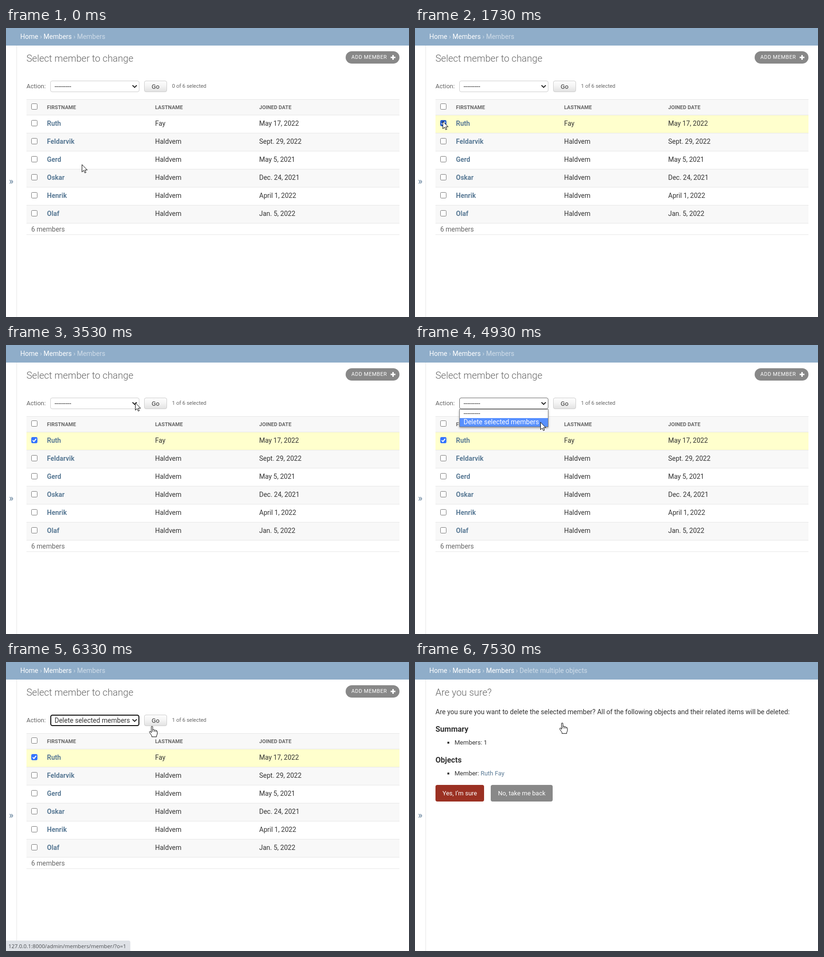
An HTML page for the animation above (8000 ms loop, 846 px wide and 609 px high).

```html
<!DOCTYPE html>
<html lang="en">
<head>
<meta charset="utf-8">
<title>Select member to change</title>
<style>
html, body { margin: 0; width: 100%; height: 100%; overflow: hidden; background: #fff; }
svg { display: block; width: 846px; height: 609px; font: 14px Roboto, Arial, sans-serif; fill: #333; }
.crumbs { fill: #cfdce8; }
.crumbs tspan, .white { fill: #fff; }
.h1 { font-size: 20px; font-weight: 300; fill: #666; }
.h2 { font-size: 16px; font-weight: 700; }
.s13 { font-size: 13px; }
.s11 { font-size: 11px; }
.mute { fill: #666; }
.th { font-size: 11px; font-weight: 700; fill: #666; }
.link { fill: #5b7b96; }
.bold { font-weight: 700; }
.mid { text-anchor: middle; }
.ui { font: 11.3px "Open Sans", "Noto Sans", sans-serif; }
.line { fill: #e6e6e6; }
</style>
</head>
<body>
<svg viewBox="0 0 846 609">
  <defs>
    <linearGradient id="shade" x2="0" y2="1">
      <stop stop-color="#fdfdfd"/><stop offset=".4" stop-color="#f6f6f6"/><stop offset="1" stop-color="#e2e2e2"/>
    </linearGradient>
    <filter id="shadow" x="-20%" y="-40%" width="140%" height="200%">
      <feDropShadow dx="0" dy="2" stdDeviation="2" flood-opacity=".35"/>
    </filter>
  </defs>
  <rect width="846" height="609" fill="#fff"/>
  <rect width="846" height="37" fill="#8fadc9"/>
  <rect class="line" x="22" y="37" width="1" height="572"/>
  <text class="link mid" x="11" y="330" font-size="20">»</text>

  <g id="list">
    <text class="crumbs" x="30" y="23"><tspan>Home</tspan> › <tspan>Members</tspan> › Members</text>
    <text class="h1" x="43" y="71">Select member to change</text>
    <rect x="713" y="49" width="113" height="26" rx="13" fill="#888"/>
    <text class="s11 white" x="725" y="65" letter-spacing=".5">ADD MEMBER</text>
    <path d="M807.5 62h10M812.5 57v10" stroke="#fff" stroke-width="3"/>
    <text class="s13 mute" x="43" y="127">Action:</text>
    <rect id="select" fill="#fff"/>
    <text id="choice" x="102" y="128"></text>
    <path d="M265.5 120.8l4.5 4.4 4.5-4.4" fill="none" stroke="#222" stroke-width="2"/>
    <rect id="go" x="290.5" y="111.5" width="47" height="23" rx="3.5"/>
    <text class="s13 mid" x="314" y="128">Go</text>
    <text id="count" class="s11 mute" x="348.5" y="126"></text>
    <g id="table"></g>
    <text class="mute" x="53" y="429">6 members</text>
    <rect class="line" x="43" y="435" width="783" height="1"/>
    <g id="popup">
      <rect x="93.5" y="135.5" width="186" height="37" fill="#fff" stroke="#777" filter="url(#shadow)"/>
      <rect id="mark" x="94" width="185" height="18" fill="#5890ff"/>
      <text id="opt0" x="102" y="149">---------</text>
      <text id="opt1" x="102" y="167">Delete selected members</text>
    </g>
    <g id="status">
      <path d="M0 587h257q4 0 4 4v18H0z" fill="#dee1e6"/>
      <text class="ui" x="5" y="603" fill="#4a4d51">127.0.0.1:8000/admin/members/member/?o=1</text>
    </g>
    <g id="tip">
      <rect x="319.5" y="143.5" width="135" height="22" fill="#fff" stroke="#999" filter="url(#shadow)"/>
      <text class="ui mid" x="387" y="159" fill="#575757">Run the selected action</text>
    </g>
  </g>

  <g id="confirm">
    <text class="crumbs" x="30" y="23"><tspan>Home</tspan> › <tspan>Members</tspan> › <tspan>Members</tspan> › Delete multiple objects</text>
    <text class="h1" x="43" y="71">Are you sure?</text>
    <text x="43" y="110">Are you sure you want to delete the selected member? All of the following objects and their related items will be deleted:</text>
    <text class="h2" x="43" y="147">Summary</text>
    <path d="M68 168h4v4h-4zM68 233h4v4h-4z"/>
    <text class="s13" x="83" y="174">Members: 1</text>
    <text class="h2" x="43" y="212">Objects</text>
    <text class="s13" x="83" y="239">Member: <tspan class="link">Ruth Fay</tspan></text>
    <rect x="43" y="259" width="102" height="35" rx="4" fill="#9b3123"/>
    <text class="s13 white mid" x="94" y="281">Yes, I’m sure</text>
    <rect x="159" y="259" width="130" height="35" rx="4" fill="#888"/>
    <text class="s13 white mid" x="224" y="281">No, take me back</text>
  </g>

  <g id="cursor" fill="#fff" stroke="#000" stroke-linejoin="round">
    <path id="arrow" d="M.5 .8V16.4L4.1 13 6.5 18.4 8.9 17.4 6.6 12.2H11.5Z"/>
    <g id="hand">
      <path d="M-1.5 14V2q0-1.5 1.5-1.5t1.5 1.5v6q1-1.2 2.5-.6 .8.3 1 1.3 1-.8 2.2-.2 .8.4 1 1.4 1.5-.6 2.2.2 .6.7.6 2v4q0 2-1.5 4v2.6h-10v-2.4l-4.5-6.5q-1-1.7.2-2.4 1.4-.6 2.8 1z"/>
      <path d="M1.5 8v4M5 8.7v3.5M8.2 9.9v2.5" fill="none"/>
    </g>
  </g>
</svg>
<script>
const $ = id => document.getElementById(id);
const set = (id, attrs) => { for (const k in attrs) $(id).setAttribute(k, attrs[k]); };
const show = (id, on) => set(id, { opacity: +on });

const people = [
  ["Ruth", "Fay", "May 17, 2022"],
  ["Feldarvik", "Haldvem", "Sept. 29, 2022"],
  ["Gerd", "Haldvem", "May 5, 2021"],
  ["Oskar", "Haldvem", "Dec. 24, 2021"],
  ["Henrik", "Haldvem", "April 1, 2022"],
  ["Olaf", "Haldvem", "Jan. 5, 2022"]
];
const cols = [86, 313, 531.5];
const bar = (y, h, fill, id = "") => `<rect id="${id}" x="43" y="${y}" width="783" height="${h}" fill="${fill}"/>`;
const box = (y, id = "") => `<rect id="${id}" x="53.5" y="${y + .5}" width="12" height="12" rx="2" fill="#fff" stroke="#767676"/>`;
const cells = (words, y, cls) => words.map((w, i) => `<text class="${cls(i)}" x="${cols[i]}" y="${y}">${w}</text>`).join("");

let html = bar(150, 34, "#f8f8f8") +
  `<rect id="head" x="76" y="151" width="227" height="32" fill="#eee"/>` +
  bar(150, 1, "#e6e6e6") + box(159) +
  cells(["FIRSTNAME", "LASTNAME", "JOINED DATE"], 171, () => "th");
people.forEach((p, i) => {
  const y = 184 + 38 * i;
  html += bar(y, 37, i % 2 ? "#f8f8f8" : "#fff", "row" + i) + bar(y - 1, 1, "#e6e6e6") +
    box(y + 10, "box" + i) + cells(p, y + 22, c => c ? "" : "link bold");
});
html += bar(411, 1, "#e6e6e6") +
  `<path id="tick" d="M56 200.8l2.6 2.7 4.8-5.8" fill="none" stroke="#fff" stroke-width="2"/>`;
$("table").innerHTML = html;

// Pointer path: step, x, y
const path = [
  [0, 159, 287], [12, 69, 205], [13, 68, 202], [17, 62, 198], [18, 62, 198], [20, 58, 196],
  [39, 58, 196], [52, 270, 126], [53, 271, 121], [62, 271, 121], [69, 268, 160], [71, 268, 160],
  [72, 261, 161], [73, 261, 161], [74, 263, 162], [86, 263, 162], [95, 306.5, 135], [99, 309, 128], [120, 309, 128]
];
function pointer(n) {
  const i = path.findIndex(p => p[0] > n);
  const [a, x, y] = path[i - 1], [b, u, v] = path[i];
  const k = (n - a) / (b - a), e = k * k * (3 - 2 * k);
  return [x + (u - x) * e, y + (v - y) * e];
}

function draw(n) {
  const [x, y] = pointer(n);
  const done = n >= 113, checked = n >= 26, open = n >= 56 && n < 87;
  const chosen = n >= 87, focus = chosen && n < 109;
  const overBox = x < 66 && y < 207;
  const overHead = chosen && y > 150;
  const overGo = chosen && y <= 135.5;

  show("list", !done);
  show("confirm", done);
  set("row0", { fill: checked ? "#ffffcd" : "#fff" });
  const blue = overBox ? "#275cc8" : "#3374ff";
  set("box0", checked ? { fill: blue, stroke: blue }
    : { fill: n === 25 ? "#f0f0f0" : "#fff", stroke: overBox ? "#4f4f4f" : "#767676" });
  show("tick", checked);
  $("count").textContent = `${+checked} of 6 selected`;

  const inset = focus ? 1 : .5;
  set("select", {
    x: 93 + inset, y: 111 + inset, width: 187 - 2 * inset, height: 24 - 2 * inset, rx: 3.5,
    stroke: focus ? "#101010" : open ? "#666" : "#ccc", "stroke-width": 2 * inset
  });
  $("choice").textContent = $(chosen ? "opt1" : "opt0").textContent;
  show("popup", open);
  const second = y > 154;
  set("mark", { y: second ? 154 : 136 });
  set("opt0", { class: second ? "" : "white" });
  set("opt1", { class: second ? "white" : "" });

  show("head", overHead);
  set("go", {
    fill: n === 109 ? "#e2e2e2" : "url(#shade)",
    stroke: n >= 96 ? "#666" : "#ccc"
  });
  show("tip", n >= 107 && n < 109);
  set("status", { opacity: n < 88 ? 0 : n === 88 ? .5 : Math.max(0, Math.min(1, (99 - n) / 4)) });

  const hand = overHead || overGo;
  show("hand", hand);
  show("arrow", !hand);
  set("cursor", { transform: `translate(${hand ? x : Math.round(x)} ${Math.round(y)})` });
}

const start = performance.now();
let last = -1;
function tick(now) {
  const t = Math.max(0, now - start) % 8000;
  const n = Math.floor((t + 4) * 15 / 1000) % 120;
  if (n !== last) draw(last = n);
  requestAnimationFrame(tick);
}
draw(0);
requestAnimationFrame(tick);
</script>
</body>
</html>
```
